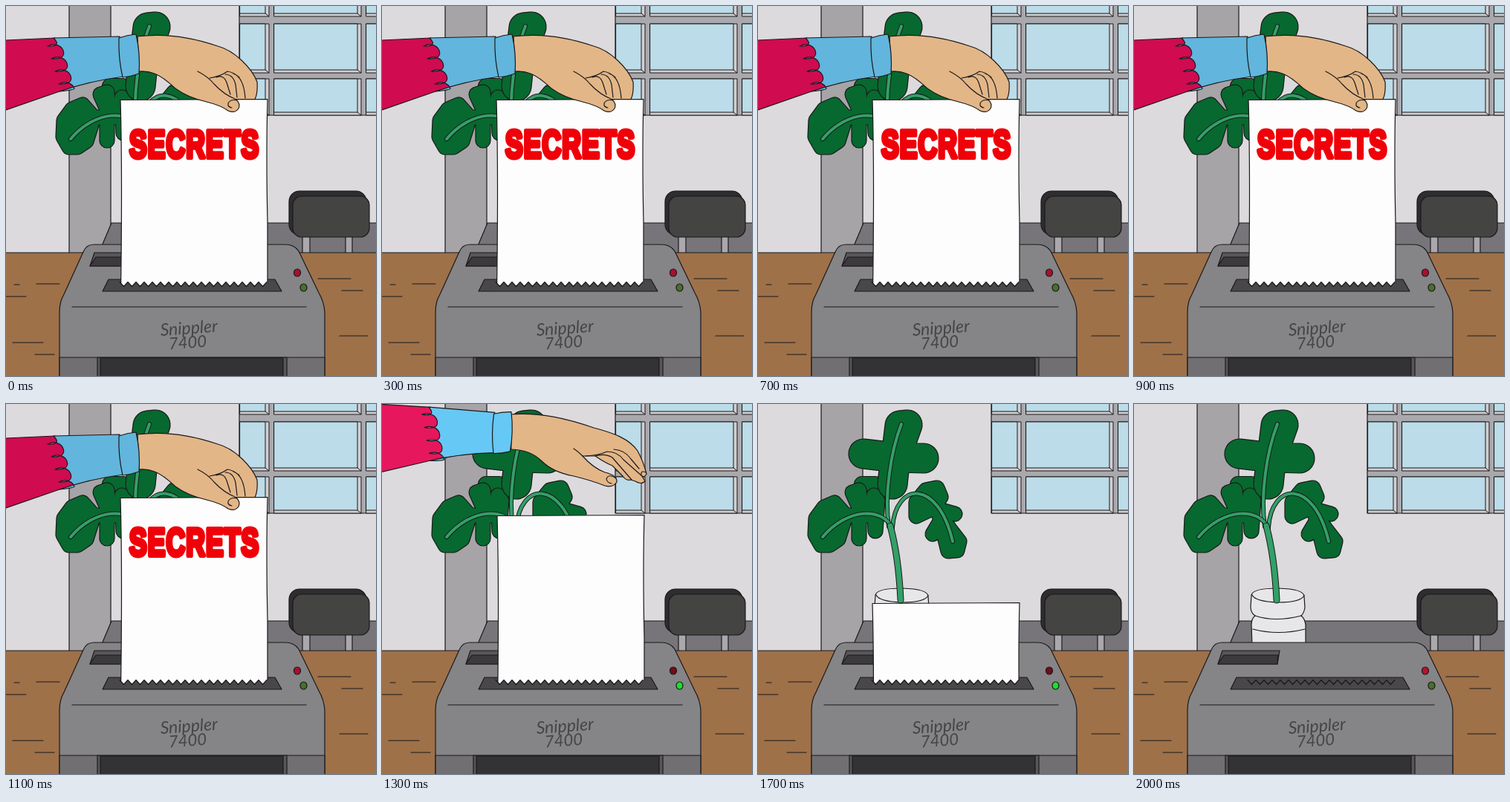
Write an HTML page that moves like this. It is 498 px wide and 498 px high and loops after 2100 ms.

```html
<!DOCTYPE html>
<html lang="en">
<head>
<meta charset="utf-8">
<title>Office shredder</title>
<style>
  html, body { margin: 0; width: 100%; height: 100%; overflow: hidden; background: #dcdadd; }
  svg { display: block; width: 100vw; height: 100vh; }
  .ink { stroke: #1b191b; stroke-width: 1.2; stroke-linejoin: round; stroke-linecap: round; }
  .line { fill: none; }
  .round { stroke-linecap: round; stroke-linejoin: round; }
  .skin { fill: #e3b687; }

  .title { font: bold 51px "Liberation Sans", Arial, sans-serif; letter-spacing: 1.6px;
           fill: #f00008; stroke: #f00008; stroke-width: 6; stroke-linejoin: round; }
  .label { font: italic 23px Lato, "Open Sans", sans-serif; fill: #464447; }

  .hold, .release, .paper, .red, .green { animation: 2100ms step-end infinite; }
  .hold { animation-name: hold; }
  .release { animation-name: release; }
  .paper { animation-name: feed; }
  .red { animation-name: red; }
  .green { animation-name: green; }

  @keyframes hold {
    0% { visibility: visible; }
    61.9%, 100% { visibility: hidden; }
  }
  @keyframes release {
    0% { visibility: hidden; transform: none; }
    61.9% { visibility: visible; transform: none; animation-timing-function: steps(3); }
    76.19%, 100% { visibility: hidden; transform: translate(-12px, -126px); }
  }
  /* steady feed, then a faster last pull */
  @keyframes feed {
    0% { transform: none; }
    61.9% { transform: translate(1px, 24px); animation-timing-function: steps(4); }
    80.95% { transform: translateY(142px); animation-timing-function: steps(3); }
    95.23%, 100% { transform: translateY(260px); }
  }
  @keyframes red {
    0% { fill: #a8102f; }
    61.9% { fill: #710d18; }
    95.23%, 100% { fill: #b8122f; }
  }
  @keyframes green {
    0% { fill: #467028; }
    61.9% { fill: #14e425; }
    95.23%, 100% { fill: #467028; }
  }
</style>
</head>
<body>
<svg viewBox="0 0 498 498" preserveAspectRatio="none">
  <defs>
    <clipPath id="mouth"><path id="mouthShape"/></clipPath>
    <g id="sleeve" class="ink">
      <path d="M-30 48 L0 46 L66 43 L110 60 V103 L72 115 L0 140 L-30 150Z" fill="var(--pink)"/>
      <path id="flames" fill="var(--blue)"/>
      <path d="M152 43 Q163 39 175 38 Q181 64 179 91 Q168 95 157 96 Q151 70 152 43Z" fill="var(--blue)"/>
    </g>
  </defs>

  <!-- room -->
  <rect width="498" height="335" fill="#dcdadd"/>
  <g class="ink">
    <path d="M85 -2 H141 V334 H85Z" fill="#a7a4a8"/>
    <path d="M142 292 H500 V334 H125 L131 318Z" fill="#777579"/>
    <path d="M314 -2 H500 V147 H314Z" fill="#a9a9ad"/>
    <g id="panes" stroke-width="1"></g>
  </g>
  <g class="ink">
    <path d="M399 308 H409 V334 H399Z M457 308 H466 V334 H457Z" fill="#aaa8ac"/>
    <rect x="381" y="249" width="104" height="59" rx="14" fill="#2f2d2f"/>
    <rect x="386" y="256" width="103" height="55" rx="12" fill="#444443"/>
  </g>
  <rect x="-2" y="332" width="502" height="170" fill="#9e7149" class="ink"/>
  <path class="ink line" d="M11 375h7 M41 374h31 M0 391h27 M9 453h41 M39 469h26 M420 367h44 M452 383h28 M449 444h38"/>

  <!-- plant -->
  <g class="ink">
    <path d="M158 258 Q158 248 194 248 Q229 249 229 259 L230 274 Q229 281 225 285 Q230 289 231 297 V325 H159
             L158 297 Q158 289 163 285 Q157 281 157 273Z" fill="#e7e6e9"/>
    <path class="line" d="M159 257 Q163 266 194 267 Q224 267 229 258 M163 285 Q190 294 225 285 M160 303 Q194 312 230 303"/>
  </g>
  <g id="plant" class="round"></g>

  <!-- machine -->
  <g class="ink">
    <path d="M72 500 V412 Q72 398 78 388 L104 331 Q108 321 118 321 H376 Q388 321 394 330 L421 386 Q428 398 429 412 V500Z" fill="#858486"/>
    <path class="line" d="M89 405 H404"/>
    <path d="M72 473 H429 V500 H72Z" fill="#716f72"/>
    <path d="M123 473 H378 V500 H123Z" fill="#59575a"/>
    <path d="M127 474 H373 V500 H127Z" fill="#333234"/>
    <path d="M119 332 H196 L193 350 H113Z" fill="#59575a"/>
    <path d="M121 338 H194 L193 350 H113Z" fill="#3c3a3d"/>
    <path d="M138 368 H362 L371 384 H130Z" fill="#49474a"/>
    <ellipse class="red" cx="392" cy="359" rx="4.5" ry="5"/>
    <ellipse class="green" cx="400.5" cy="379" rx="4.5" ry="5"/>
  </g>
  <g class="label" transform="rotate(-4 250 440)">
    <text x="208" y="441">Snippler</text>
    <text x="218" y="460" font-size="22">7400</text>
  </g>

  <!-- paper -->
  <g clip-path="url(#mouth)">
    <path class="paper ink" d="M154 126.500 L352 125.500 Q350 200 352 290 V420 H154 Q157 230 154 126.500Z" fill="#fdfdfd"/>
  </g>
  <path id="teeth" class="ink line"/>

  <!-- hand gripping the sheet -->
  <g class="hold">
    <text class="title" transform="translate(166 203.500) scale(.695 1)">SECRETS</text>
    <g class="ink">
      <path class="skin" d="M177 41 C215 36 250 42 285 54 C308 60 331 84 338 102 Q339 118 335 125.500 H309
               Q316 131 313 138 Q308 145 299 141 Q290 134 270 129 Q244 123 228 111 Q211 95 200 91 Q190 87 179 88Z"/>
      <path class="line" d="M258 88 Q272 95 280 105 Q293 119 309 125.500
               M274 97 Q288 95 298 88 Q306 89 314 96 M283 96 Q293 92 297 103 L302 119
               M295 92 Q306 92 309 106 L311 123 M306 91 Q320 96 322 124
               M311 127 Q302 125 299 131 Q298 136 304 137"/>
    </g>
    <use href="#sleeve" style="--pink:#d00b50;--blue:#62b5dc"/>
  </g>

  <!-- hand letting go -->
  <g class="release">
    <g class="ink">
      <path class="skin" d="M172 14 C215 11 250 20 285 32 C312 39 333 47 344 63 Q352 78 356 94 Q354 99 350 97
               L354 104 Q349 109 341 104 L335 102 Q329 104 324 97 L310 83 Q300 79 287 70 L270 70
               Q284 86 300 92 Q317 96 316 105 Q311 113 300 110 Q282 103 258 97 Q230 92 214 76 Q200 62 174 61Z"/>
      <path class="line" d="M258 60 Q264 64 270 70 M274 70 Q292 69 303 64 M287 70 Q300 66 310 72 L336 102
               M303 64 Q317 64 325 75 L350 97 M312 61 Q327 62 335 74 L346 87
               M315 100 Q305 93 302 101 Q303 106 309 107 M355 92 Q348 89 349 95"/>
    </g>
    <use href="#sleeve" transform="translate(-4 -28.500) rotate(6 165 67)" style="--pink:#e6175d;--blue:#66c8f4"/>
  </g>
</svg>
<script>
  const $ = id => document.getElementById(id);
  const ink = "#1b191b";

  function add(parent, d, attrs) {
    const path = document.createElementNS("http://www.w3.org/2000/svg", "path");
    path.setAttribute("d", d);
    for (const key in attrs) path.setAttribute(key, attrs[key]);
    $(parent).append(path);
  }

  // a fat round stroke over a slightly fatter dark one gives one merged outline
  function cased(d, width, rim, color, fill = "none") {
    add("plant", d, { fill, stroke: ink, "stroke-width": width + rim });
    add("plant", d, { fill, stroke: color, "stroke-width": width - rim });
  }

  // lobes of each leaf as limbs of one round stroke
  const leaf = (d, width) => cased(d, width, 1.2, "#07692f", "#07692f");
  leaf("M140 108 H158 L162 125Z", 21);
  leaf("M85 190 L77 176 L78 154 L89 139 L103 133 L118 150 L108 182 L96 190Z M110 150 H158 M127 119 L136 116 L140 148Z M156 123 L161 130 L158 171Z M136 181 V150", 20);
  leaf("M213 151 V132 L226 116 L241 113 L246 125 L236 140Z M236 140 L265 148 M250 150 L235 175 M244 150 L271 185 L268 197 L256 198Z", 20);
  leaf("M191 29 L201 28 L186 70Z M142 67 L185 72 L223 73 M185 70 L181 108", 40);

  const vein = (d, width) => cased(d, width, 1, "#33a068");
  vein("M176 165 C170 125 178 65 193 27", 5);
  vein("M181 168 C168 138 120 140 87 179", 5);
  vein("M181 166 C185 105 242 100 262 185", 5);
  vein("M192 264 C190 222 185 190 178 164", 8);

  // blue tongues licking back over the pink sleeve
  let flames = "M64 43";
  for (let i = 0; i < 4; i++) {
    const x = 56 + 5 * i, y = 54 + 17 * i;
    flames += `Q${x + 20} ${y + 1} ${x} ${y} C${x + 10} ${y - 5} ${x + 19} ${y} ${x + 21} ${y + 6}`;
  }
  flames += "Q92 113 72 115 Q112 101 158 95 L153 41Z";
  $("flames").setAttribute("d", flames);

  // window panes with their lighter reveal
  for (const [x, w] of [[315, 39], [361, 117], [485, 40]])
    for (const [y, h] of [[-30, 44], [24, 66], [98, 49]]) {
      add("panes", `M${x} ${y}h${w}v${h}h${-w}z`, { fill: "#d0ced2" });
      add("panes", `M${x} ${y}h${w - 5}v${h - 4}h${5 - w}z`, { fill: "#bbdce8" });
      add("panes", `M${x + w - 5} ${y + h - 4}l5 4`, {});
    }

  const zigzag = "M153 371.5" + "l5.5 6l5.5 -6".repeat(18);
  $("teeth").setAttribute("d", zigzag);
  $("mouthShape").setAttribute("d", zigzag + "L360 371V0H145V371Z");
</script>
</body>
</html>
```
